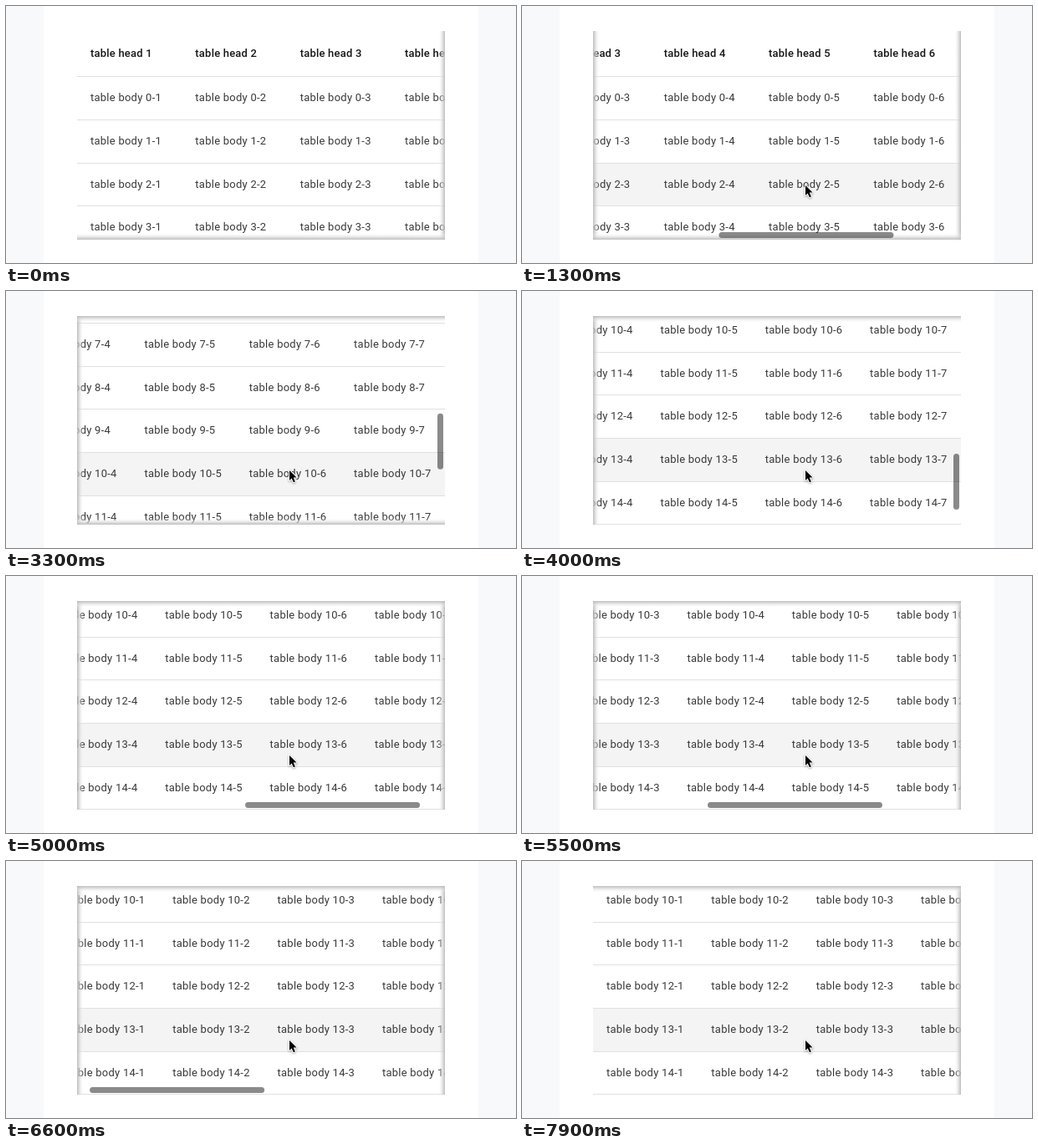
Animation of 610x308 px, one loop 8000 ms. Source, as an HTML page:

```html
<!DOCTYPE html>
<html lang="en">
<head>
<meta charset="utf-8">
<title>Scrolling table</title>
<style>
  html, body { margin: 0; width: 100%; height: 100%; overflow: hidden; background: #f7f9fb; }
  svg { display: block; }
  text { font: 13px Roboto, sans-serif; letter-spacing: .25px; fill: #393939; }
  text.head { font-weight: 500; letter-spacing: .2px; fill: #161616; }
  .line { fill: #e0e0e0; shape-rendering: crispEdges; }
  #hover { fill: #f4f4f4; shape-rendering: crispEdges; }
  .bar { fill: #000; fill-opacity: .46; }
  #arrow { filter: drop-shadow(0 1px 1px rgba(0, 0, 0, .35)); }
</style>
</head>
<body>
<svg width="610" height="308" viewBox="0 0 610 308">
  <defs>
    <clipPath id="view"><rect x="85" y="30" width="440" height="250"/></clipPath>
    <linearGradient id="shade">
      <stop offset="0" stop-color="#b6b6b6" stop-opacity=".9"/>
      <stop offset=".35" stop-color="#d0d0d0" stop-opacity=".65"/>
      <stop offset="1" stop-color="#fff" stop-opacity="0"/>
    </linearGradient>
    <path id="beamShape" fill="none" d="M335.5 209.5Q339.5 209.5 339.5 212V220Q339.5 222.5 335.5 222.5
      M343.5 209.5Q339.5 209.5 339.5 212M339.5 220Q339.5 222.5 343.5 222.5M337 217.5H342"/>
  </defs>
  <rect x="45" width="520" height="308" fill="#fff"/>
  <g clip-path="url(#view)">
    <g id="rows"><rect id="hover" x="85" width="440"/></g>
    <g id="cells"></g>
    <g fill="url(#shade)">
      <rect id="left" width="8" height="250" transform="translate(85 30)"/>
      <rect id="right" width="8" height="250" transform="translate(525 280) rotate(180)"/>
      <rect id="top" width="8" height="440" transform="translate(525 30) rotate(90)"/>
      <rect id="bottom" width="8" height="440" transform="translate(85 280) rotate(-90)"/>
    </g>
    <rect id="barX" class="bar" y="271" width="209" height="7" rx="3.5"/>
    <rect id="barY" class="bar" x="516" width="7" height="67" rx="3.5"/>
  </g>
  <path id="arrow" transform="translate(339 215) scale(.84)" stroke="#fff" stroke-width="2.4"
    stroke-linejoin="round" paint-order="stroke" d="M0 0V14.2L3.2 11.2 5.8 17 8.2 16 5.7 10.2H10.2Z"/>
  <g id="beam">
    <use href="#beamShape" stroke="#fff" stroke-width="3"/>
    <use href="#beamShape" stroke="#000" stroke-width="1.1"/>
  </g>
</svg>
<script>
const LOOP = 8000, STEP = 100;
const COLS = 7, ROWS = 15, COL_W = 125.35, ROW_H = 51.7, BODY_Y = 84.3;
const MAX_X = 437, MAX_Y = 580.4, POINTER_Y = 214;

const $ = id => document.getElementById(id);
const clamp = v => Math.max(0, Math.min(1, v));

function add(parent, name, attrs, content = '') {
  const el = document.createElementNS('http://www.w3.org/2000/svg', name);
  for (const key in attrs) el.setAttribute(key, attrs[key]);
  el.textContent = content;
  parent.append(el);
}

for (let row = -1; row < ROWS; row++) {
  const isHead = row < 0;
  add($('rows'), 'rect', { class: 'line', x: 85, y: BODY_Y + (row + 1) * ROW_H, width: 440, height: 1 });
  for (let col = 0; col < COLS; col++) {
    add($('cells'), 'text', {
      class: isHead ? 'head' : 'body',
      x: 101 + col * COL_W,
      y: isHead ? 61 : BODY_Y + 30 + row * ROW_H
    }, isHead ? `table head ${col + 1}` : `table body ${row}-${col + 1}`);
  }
}

// Trackpad-like scroll: a soft start followed by a long glide.
function glide(t, start, end, decay) {
  const u = clamp((t - start) / (end - start));
  return 1 - (1 - u ** 1.32) ** decay;
}

// A scrollbar shows while scrolling and fades half a second afterwards.
function barAlpha(t, start, end) {
  return t < start ? 0 : clamp((end + 640 - t) / 160);
}

function show(id, alpha) {
  $(id).setAttribute('opacity', alpha);
}

function draw(t) {
  const x = MAX_X * (glide(t, 850, 2000, 3.55) - glide(t, 4850, 7000, 1.935));
  const y = MAX_Y * glide(t, 2850, 4000, 3.55);

  $('rows').setAttribute('transform', `translate(0 ${-y})`);
  $('cells').setAttribute('transform', `translate(${-x} ${-y})`);

  const row = Math.min(ROWS - 1, Math.floor((POINTER_Y + y - BODY_Y) / ROW_H));
  $('hover').setAttribute('y', BODY_Y + row * ROW_H);
  $('hover').setAttribute('height', ROW_H);

  show('left', clamp(x / 10));
  show('right', clamp((MAX_X - x) / 10));
  show('top', clamp(y / 10));
  show('bottom', clamp((MAX_Y - y) / 10));

  $('barX').setAttribute('x', 87 + x * .483);
  $('barY').setAttribute('y', 32 + y * .281);
  show('barX', Math.max(barAlpha(t, 850, 2000) * (t < 4000), barAlpha(t, 4850, 7000)));
  show('barY', barAlpha(t, 2850, 4000));

  const inside = t >= 300, overText = t >= 2000 && t < 2900;
  show('hover', +inside);
  show('arrow', +(inside && !overText));
  show('beam', +overText);
}

function tick(now) {
  draw(Math.floor((now + 10) / STEP) * STEP % LOOP);
  requestAnimationFrame(tick);
}
draw(0);
requestAnimationFrame(tick);
</script>
</body>
</html>
```
